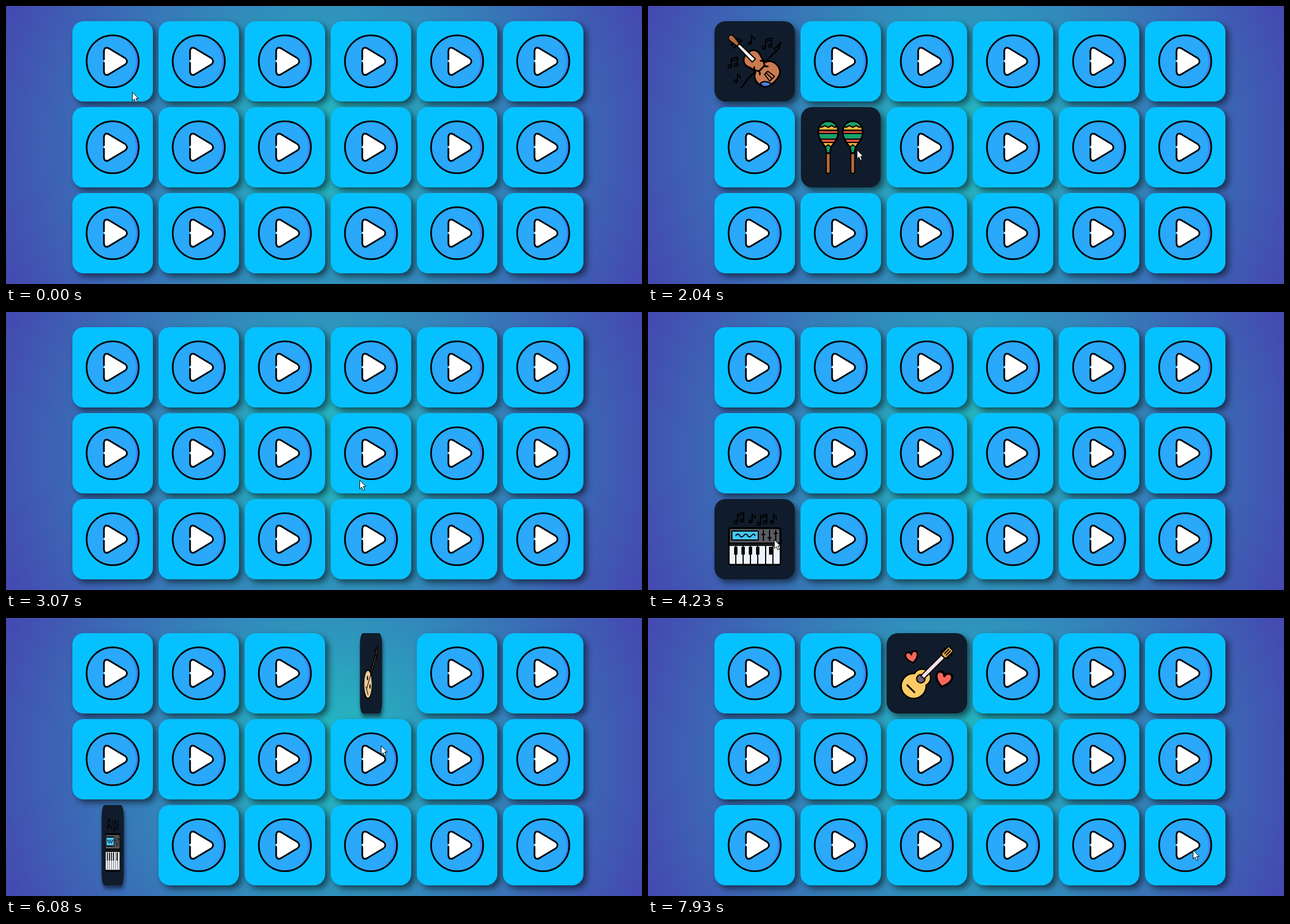
Recreate the animation shown at these times as an HTML page. Size 1130 px wide and 495 px high, loop 8 s.

```html
<!DOCTYPE html>
<html lang="en">
<head>
<meta charset="utf-8">
<title>Memory cards</title>
<style>
html, body { margin: 0; width: 100%; height: 100%; overflow: hidden; }
#stage {
  position: relative; width: 1130px; height: 495px; overflow: hidden;
  background: radial-gradient(circle at 565px 247px, rgb(34,193,195), rgb(69,72,176) 617px);
}
.card {
  position: absolute; width: 143px; height: 143px; border-radius: 20px;
  background: #06c1ff; box-shadow: 6px 6px 12px rgba(0,0,0,.55);
}
.card.open { background: #101c2b; }
.card svg { position: absolute; left: 0; top: 0; }
.card .face, .card.open .back { display: none; }
.card.open .face { display: block; }
#cursor { position: absolute; left: 0; top: 0; overflow: visible; }
.ink { stroke: #000; stroke-width: 3; stroke-linejoin: round; stroke-linecap: round; }
.line { fill: none; }
.thin { stroke-width: 2; }
</style>
</head>
<body>
<div id="stage"></div>

<svg width="0" height="0" style="position:absolute">
  <defs>
    <g id="note">
      <circle cx="-3" cy="6" r="2.6" class="ink line thin"/>
      <path d="M0 6V-8Q1-4 5-3V1" class="ink line thin"/>
    </g>
    <g id="notes">
      <circle cx="-6" cy="8" r="2.8" class="ink line thin"/>
      <circle cx="5" cy="5" r="2.8" class="ink line thin"/>
      <path d="M-3 8V-6L8-9V5M-3-2L8-5" class="ink line thin"/>
    </g>
    <path id="heart" d="M0 10C-15 0-12-10-6-10Q-1-10 0-5Q1-10 6-10C12-10 15 0 0 10Z" fill="#f9665c" class="ink"/>

    <g id="play">
      <circle cx="71.5" cy="71.5" r="46.3" fill="#2aa8fa"/>
      <path d="M96 35A43.3 43.3 0 0 1 96 108A47.7 47.7 0 0 0 96 35" fill="#3f80fa"/>
      <circle cx="71.5" cy="71.5" r="46.3" class="ink line"/>
      <path d="M56 74V90Q57 98 64 95L94 77Q100 71.5 94 66L64 48Q57 45 56 53V68" fill="#fff" class="ink" stroke-linecap="butt"/>
    </g>

    <g id="violin">
      <path d="M48 118L60 102L114 49L118 38L106 50" class="ink line"/>
      <use href="#note" x="66" y="33"/><use href="#notes" x="94" y="39"/>
      <use href="#notes" x="33" y="73"/><use href="#note" x="41" y="101"/>
      <g transform="translate(82 82) rotate(-45)">
        <path d="M0-34C14-35 18-24 15-16C13-9 11-6 13 0C24 4 26 18 21 27C15 39-15 39-21 27C-26 18-24 4-13 0C-11-6-13-9-15-16C-18-24-14-35 0-34Z" fill="#cb7b52" class="ink"/>
        <path d="M-21 20Q-11 20-7 35Q-17 34-21 27Z" fill="#4f7fe0" class="ink thin"/>
        <path d="M-10-58H10M-9-64H9" class="ink"/>
        <path d="M-3-56L-5-70Q-6-79 0-79Q6-79 5-70L3-56Z" fill="#b5683f" class="ink thin"/>
        <path d="M-3-56H3L4-17H-4Z" fill="#f4f0ee" class="ink thin"/>
        <path d="M-8-8Q-13-4-9 0T-10 8M8-8Q13-4 9 0T10 8M-5 3H5" class="ink line"/>
        <path d="M-4 14H4L6 29H-6ZM0 14V29" class="ink line thin"/>
      </g>
    </g>

    <clipPath id="egg"><path d="M0-21C13-21 18-10 18-1C18 11 9 19 5 26L3 36H-3L-5 26C-9 19-18 11-18-1C-18-10-13-21 0-21Z"/></clipPath>
    <g id="maraca">
      <rect x="-3.5" y="35" width="7" height="37" rx="3" fill="#b8683a" class="ink thin"/>
      <g clip-path="url(#egg)">
        <path d="M-20-22H20V40H-20Z" fill="#19a06a"/>
        <path d="M-20-13L-12-10L-6-13L0-10L6-13L12-10L20-13V-5H-20Z" fill="#fdb437" class="ink thin"/>
        <path d="M-20-4H20V1H-20ZM-20 11H20V17H-20Z" fill="#e4533f" class="ink thin"/>
        <path d="M-20 17H20V21L10 20L5 25L0 21L-5 25L-10 20L-20 21Z" fill="#fdb437" class="ink thin"/>
      </g>
      <path d="M0-21C13-21 18-10 18-1C18 11 9 19 5 26L3 36H-3L-5 26C-9 19-18 11-18-1C-18-10-13-21 0-21Z" class="ink line"/>
    </g>
    <g id="maracas"><use href="#maraca" x="49" y="46"/><use href="#maraca" x="93" y="46"/></g>

    <g id="synth">
      <use href="#notes" x="44" y="33"/><use href="#note" x="67" y="34"/>
      <use href="#notes" x="85" y="36"/><use href="#note" x="105" y="35"/>
      <rect x="25.5" y="52" width="92" height="65" rx="3" fill="#eef3fa" class="ink"/>
      <path d="M26 55Q26 52 29 52H114Q117 52 117 55V79H26Z" fill="#5a5b61" class="ink"/>
      <path d="M26 82H117" class="ink" stroke-width="5"/>
      <rect x="31" y="57" width="47" height="16" fill="#43c6f5" class="ink thin"/>
      <path d="M38 65q4-5 7 0t7 0t7 0t7 0t6 0" class="ink line thin"/>
      <path d="M87 56V74M98 56V74M109 56V74" class="ink thin"/>
      <path d="M85 63h4M96 69h4M107 61h4" class="ink" stroke-width="4"/>
      <path d="M38 84V116M51 84V116M64 84V116M77 84V116M91 84V116M104 84V116" class="ink thin"/>
      <path d="M38 85V99M51 85V99M64 85V99M77 85V99M100 85V99" stroke="#000" stroke-width="6"/>
    </g>

    <g id="banjo">
      <path d="M59 84L108 34" stroke="#000" stroke-width="12"/>
      <path d="M61 82L106 37" stroke="#443329" stroke-width="5"/>
      <path d="M98 34L111 24L118 31L107 43Z" fill="#30251f" class="ink"/>
      <path d="M96 32L90 29M111 45L116 49" class="ink"/>
      <circle cx="52" cy="91" r="25.5" fill="#ebc995" class="ink"/>
      <path d="M46 97L75 68" class="ink" stroke-width="7"/>
      <path d="M39 96L52 109" class="ink" stroke-width="5"/>
      <circle cx="49" cy="80" r="4"/><circle cx="65" cy="95" r="4"/>
      <path d="M34 109L30 115" class="ink"/>
    </g>

    <g id="guitar">
      <use href="#heart" transform="translate(45 43) rotate(-12)"/>
      <use href="#heart" transform="translate(101 83) rotate(14) scale(1.3)"/>
      <g transform="translate(48 94) rotate(45)">
        <g class="ink"><circle r="22"/><circle cy="-21" r="15"/></g>
        <g fill="#fdcb64"><circle r="21"/><circle cy="-21" r="14"/></g>
        <path d="M-9 7H9" class="ink"/>
        <circle cy="-18" r="7.5" fill="#6c5d74" class="ink thin"/>
        <path d="M-4-74H4V-22H-4Z" fill="#f9e1ea" class="ink thin"/>
        <path d="M-9-79H9M-9-86H9" class="ink"/>
        <path d="M-4-74L-6-77V-94H6V-77L4-74Z" fill="#dfa04c" class="ink thin"/>
        <path d="M-2-80V-90M2-80V-90" class="ink thin"/>
      </g>
    </g>
  </defs>
</svg>

<script>
const LOOP = 8000, FLIP = 800;
const stage = document.getElementById('stage');

// Card index (row by row), picture, time opened, time closed
const turns = [
  { card: 0, icon: 'violin', open: 50, close: 2310 },
  { card: 7, icon: 'maracas', open: 1445, close: 2310 },
  { card: 12, icon: 'synth', open: 3440, close: 5880 },
  { card: 3, icon: 'banjo', open: 5070, close: 5880 },
  { card: 2, icon: 'guitar', open: 6650, close: LOOP }
];

// Pointer stops: time, x, y
const path = [
  [0, 224, 153], [620, 224, 153], [880, 277, 191], [1090, 371, 256],
  [2560, 371, 256], [3070, 628, 299], [3150, 647, 287], [3430, 224, 405],
  [4360, 224, 405], [4700, 746, 205], [4780, 737, 154], [4980, 615, 90],
  [5560, 615, 90], [5850, 666, 227], [6260, 666, 227], [6540, 500, 110],
  [7090, 500, 110], [7460, 796, 332], [7930, 968, 413], [LOOP, 968, 413]
];

const svg = (id, cls) => `<svg class="${cls}" width="143" height="143"><use href="#${id}"/></svg>`;

const cards = Array.from({ length: 18 }, (_, i) => {
  const el = document.createElement('div');
  const turn = turns.find(t => t.card === i);
  el.className = 'card';
  el.style.left = 118 + 153 * (i % 6) + 'px';
  el.style.top = 27 + 153 * Math.floor(i / 6) + 'px';
  el.innerHTML = svg('play', 'back') + (turn ? svg(turn.icon, 'face') : '');
  stage.append(el);
  return el;
});

stage.insertAdjacentHTML('beforeend', `<svg id="cursor" width="12" height="20">
  <path d="M.5.5V16L4 12.7L6.5 18.6L9.2 17.5L6.7 11.7H11.3Z" fill="#fff" stroke="#000"/></svg>`);
const cursor = document.getElementById('cursor');

// The CSS "ease" curve, solved by bisection
function ease(x) {
  if (x <= 0) return 0;
  if (x >= 1) return 1;
  const bezier = (a, b, s) => 3 * a * s * (1 - s) ** 2 + 3 * b * s * s * (1 - s) + s ** 3;
  let lo = 0, hi = 1;
  for (let i = 0; i < 20; i++) {
    const mid = (lo + hi) / 2;
    if (bezier(.25, .25, mid) < x) lo = mid; else hi = mid;
  }
  return bezier(.1, 1, lo);
}

function pointer(t) {
  const i = path.findIndex(p => p[0] > t);
  const [t0, x0, y0] = path[i - 1], [t1, x1, y1] = path[i];
  const k = (t - t0) / (t1 - t0);
  return [x0 + (x1 - x0) * k, y0 + (y1 - y0) * k];
}

function draw(now) {
  const t = now % LOOP;
  for (const { card, open, close } of turns) {
    const turned = ease((t - open) / FLIP) - ease((t - close) / FLIP);
    const width = Math.cos(Math.PI * turned);
    cards[card].classList.toggle('open', width < 0);
    cards[card].style.transform = `scaleX(${Math.abs(width)})`;
  }
  const [x, y] = pointer(t);
  cursor.style.transform = `translate(${Math.round(x)}px, ${Math.round(y)}px)`;
}

const start = performance.now();
function tick() {
  draw(performance.now() - start);
  requestAnimationFrame(tick);
}
tick();
</script>
</body>
</html>
```
